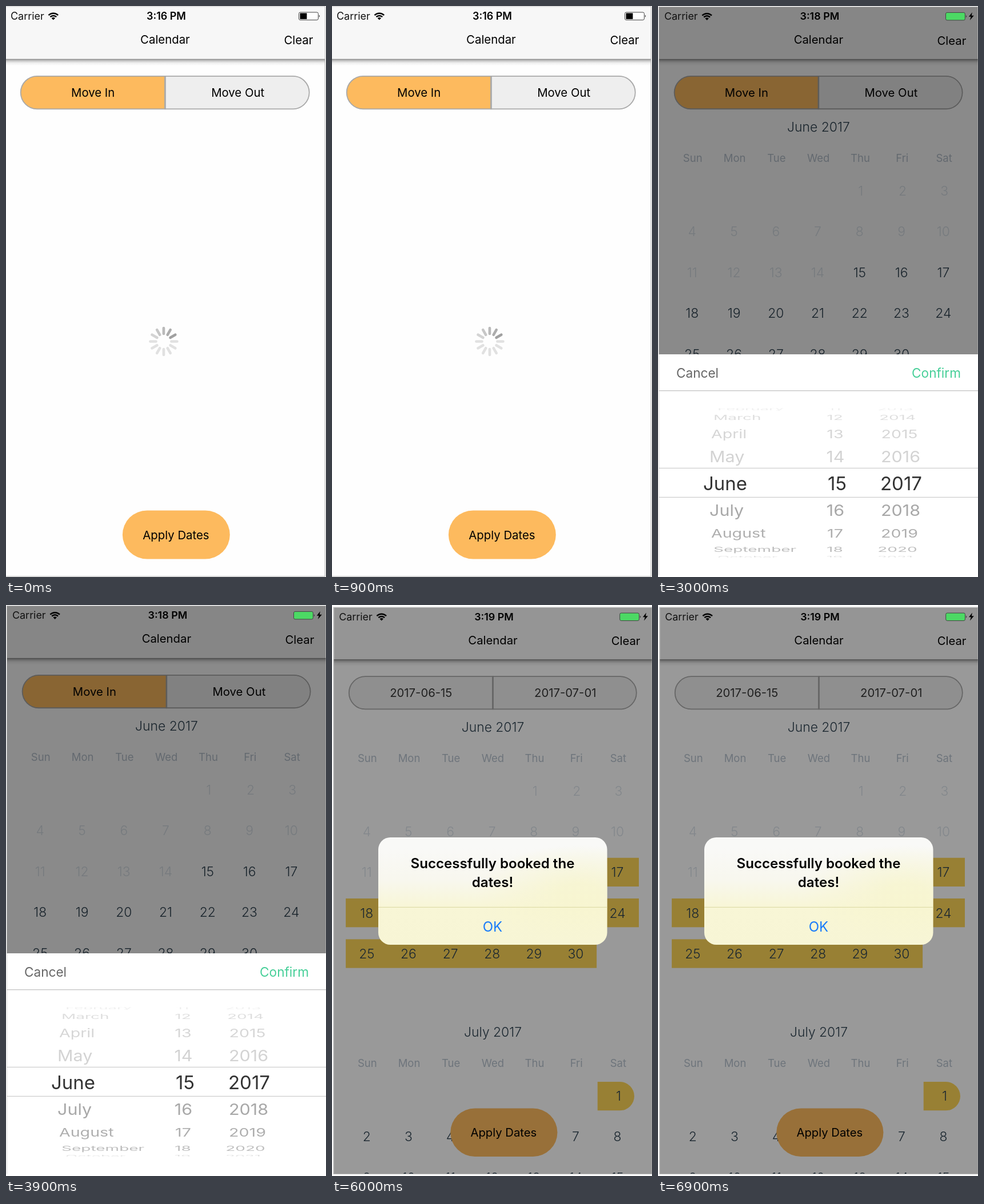
An HTML page for the animation above (7.5 s loop, 560 px wide and 1000 px high).

```html
<!DOCTYPE html>
<html lang="en">
<head>
<meta charset="utf-8">
<title>Calendar booking</title>
<style>
html, body { margin: 0; width: 100%; height: 100%; overflow: hidden; background: #fff; }
svg { display: block; width: 100vw; height: 100vh; font-family: Inter, "Liberation Sans", sans-serif; }
</style>
</head>
<body>
<svg viewBox="0 0 560 1000">
  <defs>
    <clipPath id="screen"><rect y="1.5" width="560" height="997"/></clipPath>
    <clipPath id="wheel"><rect y="704.5" width="560" height="261"/></clipPath>
    <linearGradient id="shadow" x2="0" y2="1">
      <stop offset="0" stop-opacity=".5"/>
      <stop offset=".25" stop-opacity=".24"/>
      <stop offset=".6" stop-opacity=".06"/>
      <stop offset="1" stop-opacity="0"/>
    </linearGradient>
    <linearGradient id="frost" x2="0" y2="1">
      <stop offset=".1" stop-color="#f9f9f7"/>
      <stop offset=".4" stop-color="#f8f7ee"/>
      <stop offset=".65" stop-color="#f8f6d6"/>
      <stop offset="1" stop-color="#f7f5d5"/>
    </linearGradient>
    <radialGradient id="glow" cx=".88" cy=".52" r=".45">
      <stop offset=".2" stop-color="#f7f5cf" stop-opacity=".85"/>
      <stop offset="1" stop-color="#f7f5cf" stop-opacity="0"/>
    </radialGradient>
  </defs>
  <g id="stage"></g>
</svg>
<script>
const HOLD = 1500;
const INK = '#2d4150', FADED = '#d9e1e8', ORANGE = '#fdba5e', YELLOW = '#fdd557', GREY = '#eee';
const WEEK = ['Sun', 'Mon', 'Tue', 'Wed', 'Thu', 'Fri', 'Sat'];
const MONTHS = ['February', 'March', 'April', 'May', 'June', 'July', 'August', 'September', 'October'];

// view: scale x, scale y, shift x, shift y of the phone screen
const scenes = [
  { view: [.998, 1, -1, 0], time: '3:16 PM', loading: true },
  { view: [1, 1, 0, 0], time: '3:18 PM' },
  { view: [.996, .9965, 2, .5], time: '3:18 PM', dim: .46, popup: picker },
  { view: [.996, .997, .1, 1.2], time: '3:19 PM', booked: true },
  { view: [.994, .9943, 3.2, 3.1], time: '3:19 PM', booked: true, dim: .4, popup: alertBox }
];

const text = (x, y, str, size, fill = '#000', anchor = 'middle', weight = 400) =>
  `<text x="${x}" y="${y}" font-size="${size}" fill="${fill}" text-anchor="${anchor}" font-weight="${weight}">${str}</text>`;
const rect = (x, y, w, h, fill, more = '') =>
  `<rect x="${x}" y="${y}" width="${w}" height="${h}" fill="${fill}" ${more}/>`;
const path = (d, fill, more = '') => `<path d="${d}" fill="${fill}" ${more}/>`;
const times = (n, fn) => Array.from({ length: n }, (_, i) => fn(i)).join('');

function statusBar({ time, loading }) {
  const arc = r => {
    const d = r * Math.SQRT1_2;
    return `M${84 - d} ${24.5 - d}A${r} ${r} 0 0 1 ${84 + d} ${24.5 - d}`;
  };
  const x = loading ? 514.5 : 503.5;
  return text(9, 24, 'Carrier', 18, '#111', 'start') +
    path(arc(11.8) + arc(7.6), 'none', 'stroke="#000" stroke-width="2.5"') +
    path(arc(4.5) + 'L84 24.5Z', '#000') +
    text(282, 24, time, 18, '#000', 'middle', 600) +
    rect(x, 11, 34, 13.5, loading ? '#fff' : '#4cd964', 'rx="2.5" stroke="#444"') +
    path(`M${x + 35.5} 15.5q2.5 2.2 0 4.5z`, '#333') +
    (loading ? rect(x + 2, 12.5, 12, 10.5, '#000')
      : path('M550 10.5L544 18.3H547.8L546 24.5L553 16.3H549Z', '#000'));
}

function header() {
  return rect(0, 92.5, 560, 12, 'url(#shadow)') + rect(0, 0, 560, 92.5, '#f7f7f7') +
    text(280, 66, 'Calendar', 20.4) + text(514, 67.5, 'Clear', 20.4);
}

function tabs(booked) {
  const [a, b] = booked ? ['2017-06-15', '2017-07-01'] : ['Move In', 'Move Out'];
  const edge = 'stroke="#a9a9a9" stroke-width="1.8"', ink = booked ? '#333' : '#000';
  return path('M280 122.8H55.5a28.8 28.8 0 0 0 0 57.6H280Z', booked ? GREY : ORANGE, edge) +
    path('M280 122.8H504a28.8 28.8 0 0 1 0 57.6H280Z', GREY, edge) +
    rect(278.7, 122, 2.6, 59, '#a9a9a9') +
    text(153.5, 159, a, 20.4, ink) + text(407.5, 159, b, 20.4, ink);
}

function month(name, top, first, count, today) {
  const day = i => {
    const cell = first + i, row = Math.floor(cell / 7);
    return text(58 + 73.55 * (cell % 7) + (row ? 0 : 2), top + 120.5 + 71.75 * row, i + 1, 23,
      i + 1 < today ? FADED : INK, 'middle', 300);
  };
  return text(280, top + 8, name + ' 2017', 23, INK, 'middle', 300) +
    WEEK.map((d, i) => text(59 + 73.6 * i, top + 61, d, 18.6, '#b6c1cd')).join('') +
    times(count, day);
}

function bookedBars() {
  const h = 50.6, r = h / 2;
  return path(`M537 442.1H${324 + r}a${r} ${r} 0 0 0 0 ${h}H537Z`, YELLOW) +
    rect(21, 513.8, 516, h, YELLOW) + rect(21, 585.6, 441.7, h, YELLOW) +
    path(`M464.3 836.7H${529 - r}a${r} ${r} 0 0 1 0 ${h}H464.3Z`, YELLOW);
}

function spinner() {
  return times(12, i => {
    const shade = Math.min(225, 160 + 13 * i);
    return `<line x1="277.5" x2="277.5" y1="564" y2="574" stroke="rgb(${shade},${shade},${shade})"
      stroke-width="4.7" stroke-linecap="round" transform="rotate(${60 - 30 * i} 277.5 587.5)"/>`;
  });
}

function picker() {
  const size = [33, 30.5, 28.6, 28, 27.5], drop = [0, 47, 87, 115.5, 130];
  const squash = [1, .9, .72, .43, .2], alpha = [1, 1, .92, .75, .35];
  const monthX = [79, 90, 93, 97, 104], dayX = [313.5, 310.5, 310, 309.5, 309];
  const yearX = [425.5, 424.5, 422.5, 419, 415];
  const row = i => {
    const k = i - 4, n = Math.abs(k), s = size[n];
    const fill = k ? (k < 0 ? '#d3d3d3' : '#a8a8a8') : '#333';
    const y = s * .364;
    return `<g transform="translate(0 ${836 + Math.sign(k) * drop[n]}) scale(1 ${squash[n]})" opacity="${alpha[n]}">` +
      text(monthX[n], y, MONTHS[i], s, fill, 'start') +
      text(dayX[n], y, 15 + k, s, fill) + text(yearX[n], y, 2017 + k, s, fill) + '</g>';
  };
  return rect(1.5, 610, 559, 390, '#fff') +
    text(32, 650.5, 'Cancel', 22.6, '#666', 'start') +
    text(530, 650.5, 'Confirm', 22.6, '#46cf98', 'end') +
    rect(1.5, 673, 559, 1.4, '#c8c8c8') +
    `<g clip-path="url(#wheel)">${times(9, row)}</g>` +
    rect(1.5, 808.8, 559, 1.2, '#ccc') + rect(1.5, 859.8, 559, 1.2, '#ccc');
}

function alertBox() {
  const box = fill => rect(81, 407, 400.5, 188, fill, 'rx="21"');
  return box('url(#frost)') + box('url(#glow)') +
    rect(81, 528.8, 400.5, 1.1, '#dddba6') +
    text(281, 461, 'Successfully booked the', 24.1, '#000', 'middle', 600) +
    text(281, 493.5, 'dates!', 24.1, '#000', 'middle', 600) +
    text(281, 571.5, 'OK', 24, '#1a7cf9');
}

function draw(s) {
  const [sx, sy, dx, dy] = s.view;
  const body = s.loading ? spinner()
    : (s.booked ? bookedBars() : '') + month('June', 212, 4, 30, 15) + month('July', 749.5, 6, 31, 0);
  return `<g transform="matrix(${sx} 0 0 ${sy} ${dx} ${dy})">` +
    rect(0, 1.5, 560, 997, '#fff', 'stroke="#b4b4b4" stroke-width="2"') +
    '<g clip-path="url(#screen)">' + rect(0, 0, 560, 1000, '#fefefe') +
    body + header() + tabs(s.booked) +
    rect(205.3, 883.4, 188.3, 85, ORANGE, 'rx="43"') + text(299, 933.7, 'Apply Dates', 20.4) +
    (s.dim ? rect(0, 0, 560, 1000, '#000', `opacity="${s.dim}"`) : '') +
    statusBar(s) + '</g></g>' + (s.popup ? s.popup() : '');
}

const stage = document.getElementById('stage');
const start = performance.now();
let shown = -1;

function tick() {
  const i = Math.floor((performance.now() - start) / HOLD) % scenes.length;
  if (i !== shown) stage.innerHTML = draw(scenes[shown = i]);
  requestAnimationFrame(tick);
}
tick();
</script>
</body>
</html>
```
